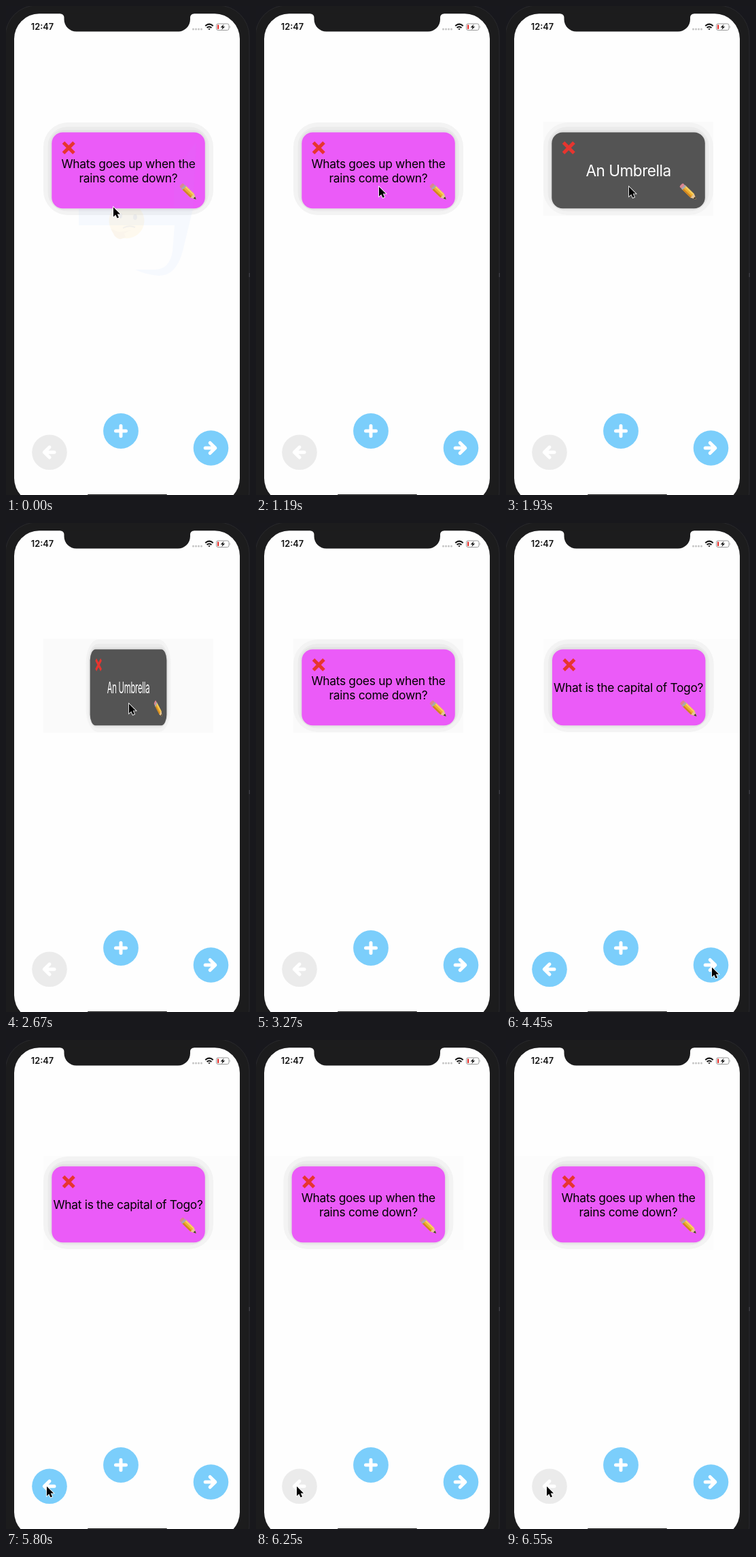
Animation, 359 px wide and 718 px high, one loop 8000 ms. Source, as an HTML page:

```html
<!DOCTYPE html>
<html lang="en">
<head>
<meta charset="utf-8">
<title>Flash cards</title>
<style>
  html, body { margin: 0; width: 100%; height: 100%; overflow: hidden; background: #1b1b1c; }
  svg { display: block; width: 100vw; height: 100vh; }
  text { font-family: Inter, Roboto, sans-serif; text-anchor: middle; }
  .ask { font-size: 17.4px; letter-spacing: -.3px; }
  .reply { font-size: 22.6px; letter-spacing: -.5px; fill: #fff; }
  .icon { fill: none; stroke: #fff; stroke-width: 5; stroke-linecap: round; stroke-linejoin: round; }
</style>
</head>
<body>
<svg viewBox="0 0 359 718" preserveAspectRatio="none">
  <defs>
    <clipPath id="screen"><rect x="12" y="11.300" width="332" height="719" rx="37"/></clipPath>
    <g id="halo">
      <rect x="55" y="171" width="250" height="136" rx="36" fill="#f3f3f3"/>
      <rect x="61.500" y="177.500" width="237" height="124" rx="28" fill="#ebebeb"/>
      <rect x="65" y="182" width="230" height="117" rx="20" fill="#e3e3e3"/>
    </g>
    <g id="tools">
      <path d="M84.500 200.500L100 216M100 200.500L84.500 216" stroke="#e7352f" stroke-width="5" fill="none"/>
      <g transform="translate(257.500 262.500) rotate(44)">
        <path d="M5 -3.800H23L31 0L23 3.800H5Z" fill="#f0b030"/>
        <path d="M5 -3.800H23L24.500 -1.500H5Z" fill="#f8d060"/>
        <path d="M5 1.500H24.500L23 3.800H5Z" fill="#cf8420"/>
        <path d="M23 -3.800L31 0L23 3.800Z" fill="#e6c596"/>
        <path d="M27 -1.900L31 0L27 1.900Z" fill="#3b3430"/>
        <rect x="3.500" y="-3.800" width="3.500" height="7.600" fill="#a9a9ad"/>
        <rect x="0" y="-3.800" width="4" height="7.600" rx="2" fill="#dc8590"/>
      </g>
    </g>
    <rect id="face" x="67.300" y="185.500" width="225.500" height="111.800" rx="16"/>
    <g id="front">
      <use href="#halo"/>
      <use href="#face" fill="#eb5bf8"/>
      <use href="#tools"/>
    </g>
    <g id="back">
      <use href="#halo"/>
      <use href="#face" fill="#545454"/>
      <use href="#tools"/>
    </g>
    <path id="arrow" class="icon" d="M-7.500 0H7M-.5 -7.500L7.200 0L-.5 7.500"/>
  </defs>

  <!-- phone body -->
  <rect width="359" height="718" fill="#18181d"/>
  <rect x="-1" y="-1" width="359" height="760" rx="46" fill="#1c1c1d" stroke="#29292c"/>
  <rect x="357.500" y="392" width="1.500" height="6" fill="#3a3a42"/>

  <g clip-path="url(#screen)">
    <rect width="359" height="731" fill="#fefefe"/>
    <rect id="tint" y="170" height="138"/>

    <g id="one">
      <g id="ask">
        <use href="#front"/>
        <text class="ask" x="180" y="237.500">Whats goes up when the</text>
        <text class="ask" x="180" y="259.200">rains come down?</text>
      </g>
      <g id="reply">
        <use href="#back"/>
        <text class="reply" x="180" y="250">An Umbrella</text>
      </g>
    </g>
    <g id="two">
      <use href="#front"/>
      <text class="ask" x="179.500" y="248.300">What is the capital of Togo?</text>
    </g>

    <g id="ghost">
      <path d="M107 298H275L260 360Q250 397 224 396Q204 394 190 387H220Q241 386 245 360L248 322H107Z" fill="#6f9cf0" opacity=".055"/>
      <path d="M247 298V250Q262 222 280 200L275 298Z" fill="#8fa8ff" opacity=".04"/>
      <g opacity=".08">
        <path d="M158 298H197A26 26 0 1 1 158 298Z" fill="#ffc83d"/>
        <ellipse cx="168" cy="308" rx="3" ry="4" fill="#6b4a1a"/>
        <ellipse cx="190" cy="310" rx="3" ry="4" fill="#6b4a1a"/>
        <path d="M172 326Q181 321 190 325" fill="none" stroke="#6b4a1a" stroke-width="2"/>
        <path d="M154 327L160 338Q168 346 176 339L174 334L184 329L166 332Z" fill="#e09a2c"/>
      </g>
    </g>

    <circle id="prev" cx="64" cy="655.300" r="25.800"/>
    <use href="#arrow" transform="translate(63.500 655.300) scale(-1 1)"/>
    <circle cx="169" cy="624" r="25.900" fill="#7bcefb"/>
    <path class="icon" d="M161.500 624H176.500M169 616.500V631.500"/>
    <circle cx="301.500" cy="649" r="25.800" fill="#7bcefb"/>
    <use href="#arrow" transform="translate(300.700 649)"/>
    <rect x="120" y="717" width="117" height="4" rx="1" fill="#222"/>

    <!-- status bar -->
    <text x="53.500" y="35.300" font-size="12.800" font-weight="600" fill="#111">12:47</text>
    <g fill="#c4c4c4">
      <circle cx="275.500" cy="34" r="1.500"/><circle cx="279.500" cy="34" r="1.500"/>
      <circle cx="283.500" cy="34" r="1.500"/><circle cx="287.500" cy="34" r="1.500"/>
    </g>
    <g fill="none" stroke="#111" stroke-width="2">
      <path d="M293.300 29.300Q299 24 304.700 29.300M295.600 32Q299 29 302.400 32"/>
      <path d="M297.300 33.600Q299 32.300 300.700 33.600L299 35.300Z" fill="#111" stroke="none"/>
    </g>
    <rect x="309.500" y="26" width="18.500" height="9.500" rx="2.500" fill="#fff" stroke="#999"/>
    <rect x="311" y="27.500" width="2.200" height="6.500" rx=".8" fill="#e5322d"/>
    <path d="M329.300 29Q331 30.700 329.300 32.500Z" fill="#999"/>
    <path d="M320.500 26.800L315.600 31.500H318.600L317.300 35L322.200 30.200H319.200Z" fill="#111"/>
  </g>
  <path d="M80 10.500V11.300A5.500 5.500 0 0 1 85.500 17V19.500A18 18 0 0 0 103.500 37.500H253A18 18 0 0 0 271 19.500V17A5.500 5.500 0 0 1 276.500 11.300V10.500Z" fill="#1c1c1d"/>

  <g id="cursor">
    <path transform="translate(1 1.500) scale(.86)"
      d="M0 0V16.200L3.800 12.700L6.500 18.700L9.300 17.500L6.700 11.600H11.700Z"
      fill="#000" stroke="#fff" stroke-width="1.900" paint-order="stroke"/>
  </g>
</svg>
<script>
  const LOOP = 8000, TICK = 149, PAGE = 332, MID = 180;
  const el = id => document.getElementById(id);
  const [tint, one, two, ask, reply, ghost, prev, cursor] =
    ["tint", "one", "two", "ask", "reply", "ghost", "prev", "cursor"].map(el);

  // The screen refreshes in ticks: whole ticks since a start, up to n.
  const ticks = (t, start, n) => Math.max(0, Math.min(n, Math.floor((t - start) / TICK)));
  const phase = (t, start, n) => t < start ? 0 : ticks(t, start - TICK, n) / n;
  const easeOut = (p, power) => 1 - Math.pow(1 - p, power);
  const show = (node, on) => node.setAttribute("display", on ? "inline" : "none");
  const move = (node, x, y = 0) => node.setAttribute("transform", `translate(${x} ${y})`);

  // Pointer moves; a row without a path hides the pointer.
  const moves = [
    { at: -9, n: 2, from: [157, 294], to: [315, 646] },
    { at: 440 },
    { at: 740, n: 3, from: [201, 503], to: [180, 264], power: 1.7 },
    { at: 2821, n: 2, from: [180, 264], to: [255, 522], power: .8 },
    { at: 3270 },
    { at: 3570, n: 2, from: [302, 665], to: [302, 651] },
    { at: 5051, n: 5, from: [302, 651], to: [59, 654], bow: 6 }
  ];

  function drawCursor(t) {
    const m = moves.filter(row => row.at <= t).pop();
    show(cursor, m.n);
    if (!m.n) return;
    const p = ticks(t, m.at, m.n) / m.n, e = easeOut(p, m.power || 1);
    const [x, y] = m.from.map((v, i) => v + (m.to[i] - v) * e);
    move(cursor, x, y - (m.bow || 0) * Math.sin(Math.PI * p));
  }

  function drawCards(t) {
    const turn = phase(t, 1630, 3) - phase(t, 2670, 3);
    const slide = easeOut(phase(t, 4150, 4), 4.5) - easeOut(phase(t, 6100, 4), 4.5);
    const width = Math.abs(Math.cos(Math.PI * turn));
    one.setAttribute("transform",
      `translate(${MID - PAGE * slide} 0) scale(${width} 1) translate(${-MID} 0)`);
    move(two, PAGE * (1 - slide));
    show(ask, turn < .5);
    show(reply, turn >= .5);
    prev.setAttribute("fill", slide > .5 ? "#7bcefb" : "#ebebeb");
  }

  function drawTint(t) {
    const left = t < 6100 ? 55 : 12;
    const right = t >= 4150 && t < 6100 ? 344 : 305;
    show(tint, t >= 1630);
    tint.setAttribute("x", left);
    tint.setAttribute("width", right - left);
    tint.setAttribute("fill", t < 4150 ? "#fafafa" : "#fcfcfc");
  }

  function draw(t) {
    drawCards(t);
    drawTint(t);
    drawCursor(t);
    ghost.setAttribute("opacity", 1 - phase(t, 140, 3));
  }

  function frame() {
    draw(performance.now() % LOOP);
    requestAnimationFrame(frame);
  }
  frame();
</script>
</body>
</html>
```
